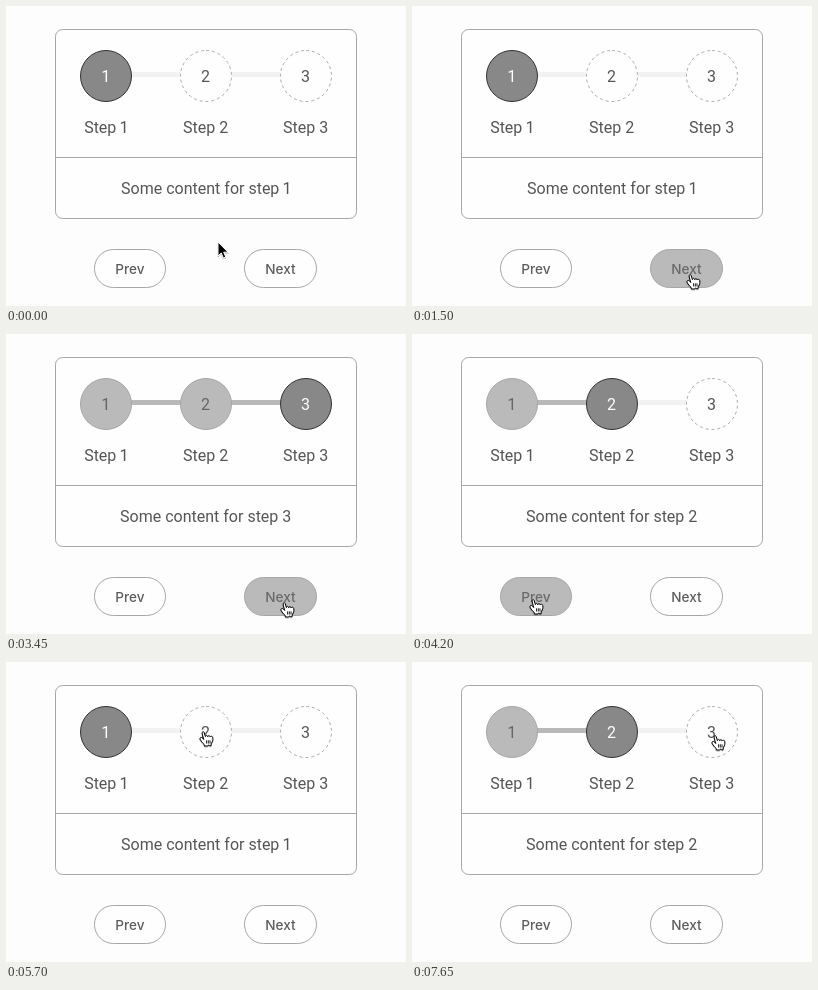
An HTML page that plays this animation: 400 by 300 pixels, repeating every 8000 ms.

```html
<!DOCTYPE html>
<html lang="en">
<head>
<meta charset="utf-8">
<title>Step wizard</title>
<style>
  html, body { margin: 0; width: 100%; height: 100%; overflow: hidden; background: #fdfdfd; }
  svg { display: block; width: 100%; height: 100%; }
  text { font: 16px Roboto, sans-serif; font-variant-numeric: proportional-nums; fill: #555; text-anchor: middle; }
  .card { fill: #fefefe; stroke: #a6a6a6; }
  .line { fill: #f2f2f2; }
  .line.done { fill: #b8b8b8; }
  .step circle { fill: #fefefe; stroke: #aaa; stroke-dasharray: 3 2.934; }
  .step.done circle { fill: #bababa; stroke: #a6a6a6; stroke-dasharray: none; }
  .step.done .number { fill: #666; }
  .step.active circle { fill: #888; stroke: #333; stroke-dasharray: none; }
  .step.active .number { fill: #fff; }
  .button rect { fill: #fefefe; stroke: #a6a6a6; }
  .button text { font: 500 13.6px Inter, sans-serif; fill: #5c5c5c; }
  .button.hover rect { fill: #bababa; }
  .button.hover text { fill: #696969; }
  #arrow, #hand { filter: drop-shadow(0 1px 0.7px #0004); }
</style>
</head>
<body>
<svg viewBox="0 0 400 300">
  <rect class="card" x="49.5" y="23.5" width="301" height="189" rx="7"/>
  <path class="card" d="M50 151.5H350"/>
  <g id="steps"></g>
  <text id="content" x="199.7" y="188"></text>
  <g id="buttons"></g>
  <path id="arrow" d="M2 1V15L5.2 12L7.4 17L9.8 16L7.7 11.2H12Z" fill="#000" stroke="#fff"/>
  <g id="hand" stroke="#000" stroke-linejoin="round">
    <path fill="#fff" d="M4.8 13.2C4 12 2.2 10.2 1.9 8.9C1.7 7.3 3.6 7.1 4.3 7.8L5.7 9.5L4.2 4C3.9 1.2 5.6 1 6.2 2.6L7.4 6.6C7.6 4.8 9.5 5 9.7 6.7C10.1 5.2 12 5.3 12.2 7C12.8 5.8 14.6 6 14.8 7.7C15 10 14.8 11.5 13.4 13.2L13 15.8H11.6L10.7 14.8L9.8 16H6.3V14.6Z"/>
    <path fill="none" stroke-width=".9" d="M8.6 10.3v3.2M10.3 10.3v3.2M12 10.3v3.2"/>
  </g>
</svg>
<script>
const LOOP = 8000;
const TICK = 150; // the pointer is redrawn at this interval
const HAND_FROM = 900;

const easeIn = p => p ** 4;
const easeOut = p => 1 - (1 - p) ** 3;
const easeInOut = p => p < 0.5 ? 4 * p ** 3 : 1 - 4 * (1 - p) ** 3;

const rest = { x: 210, y: 235 };
const moves = [
  { from: 600, to: 900, x: 208, y: 84, ease: easeIn },
  { from: 900, to: 1050, x: 286, y: 268, ease: easeOut },
  { from: 1050, to: 1200, x: 284, y: 282, ease: easeOut },
  { from: 1200, to: 1350, x: 273, y: 267, ease: easeOut },
  { from: 3450, to: 3750, x: 116, y: 264, ease: easeOut },
  { from: 5250, to: 5700, x: 192, y: 68, ease: easeOut },
  { from: 7050, to: 7500, x: 320, y: 74, ease: easeInOut },
  { from: 7500, to: 7650, x: 298, y: 72, ease: easeOut }
];

// Times at which the wizard goes one step on or back.
const forward = [2550, 3000, 6600];
const back = [4200, 5100];

const $ = id => document.getElementById(id);
const clamp = p => Math.min(1, Math.max(0, p));
const passed = (times, t) => times.filter(time => time <= t).length;

function add(parent, tag, attrs, label = "") {
  const el = document.createElementNS("http://www.w3.org/2000/svg", tag);
  for (const key in attrs) el.setAttribute(key, attrs[key]);
  el.textContent = label;
  return parent.appendChild(el);
}

const lines = [125, 225].map(x =>
  add($("steps"), "rect", { x, y: 66, width: 50, height: 5 }));

const steps = [1, 2, 3].map(n => {
  const x = n * 100;
  const group = add($("steps"), "g", {});
  add(group, "circle", { cx: x, cy: 70, r: 25.5, transform: `rotate(-90 ${x} 70)` });
  add(group, "text", { class: "number", x: x - 0.5, y: 76 }, n);
  add(group, "text", { x: x - 0.3, y: 127 }, "Step " + n);
  return group;
});

function addButton(name, x, width, from, to) {
  const group = add($("buttons"), "g", {});
  add(group, "rect", { x, y: 243.5, width, height: 38, rx: 19 });
  add(group, "text", { x: x + width / 2, y: 268 }, name);
  return { group, from, to };
}
const buttons = [
  addButton("Prev", 88.5, 71, 3600, 5400),
  addButton("Next", 238.5, 72, 1500, 3600)
];

function pointerAt(t) {
  const now = Math.floor(t / TICK) * TICK;
  return moves.reduce((pos, { from, to, x, y, ease }) => {
    const k = ease(clamp((now - from) / (to - from)));
    return { x: pos.x + (x - pos.x) * k, y: pos.y + (y - pos.y) * k };
  }, rest);
}

function draw(t) {
  const active = 1 + passed(forward, t) - passed(back, t);
  steps.forEach((group, i) => {
    const state = i + 1 < active ? "done" : i + 1 === active ? "active" : "";
    group.setAttribute("class", "step " + state);
  });
  lines.forEach((line, i) =>
    line.setAttribute("class", i + 1 < active ? "line done" : "line"));
  buttons.forEach(({ group, from, to }) =>
    group.setAttribute("class", t >= from && t < to ? "button hover" : "button"));
  $("content").textContent = "Some content for step " + active;

  const { x, y } = pointerAt(t);
  const isHand = t >= HAND_FROM;
  $("hand").setAttribute("visibility", isHand ? "visible" : "hidden");
  $("arrow").setAttribute("visibility", isHand ? "hidden" : "visible");
  $(isHand ? "hand" : "arrow").setAttribute(
    "transform", `translate(${Math.round(x)} ${Math.round(y)})`);
}

const start = performance.now();
function tick() {
  draw((performance.now() - start) % LOOP);
  requestAnimationFrame(tick);
}
tick();
</script>
</body>
</html>
```
